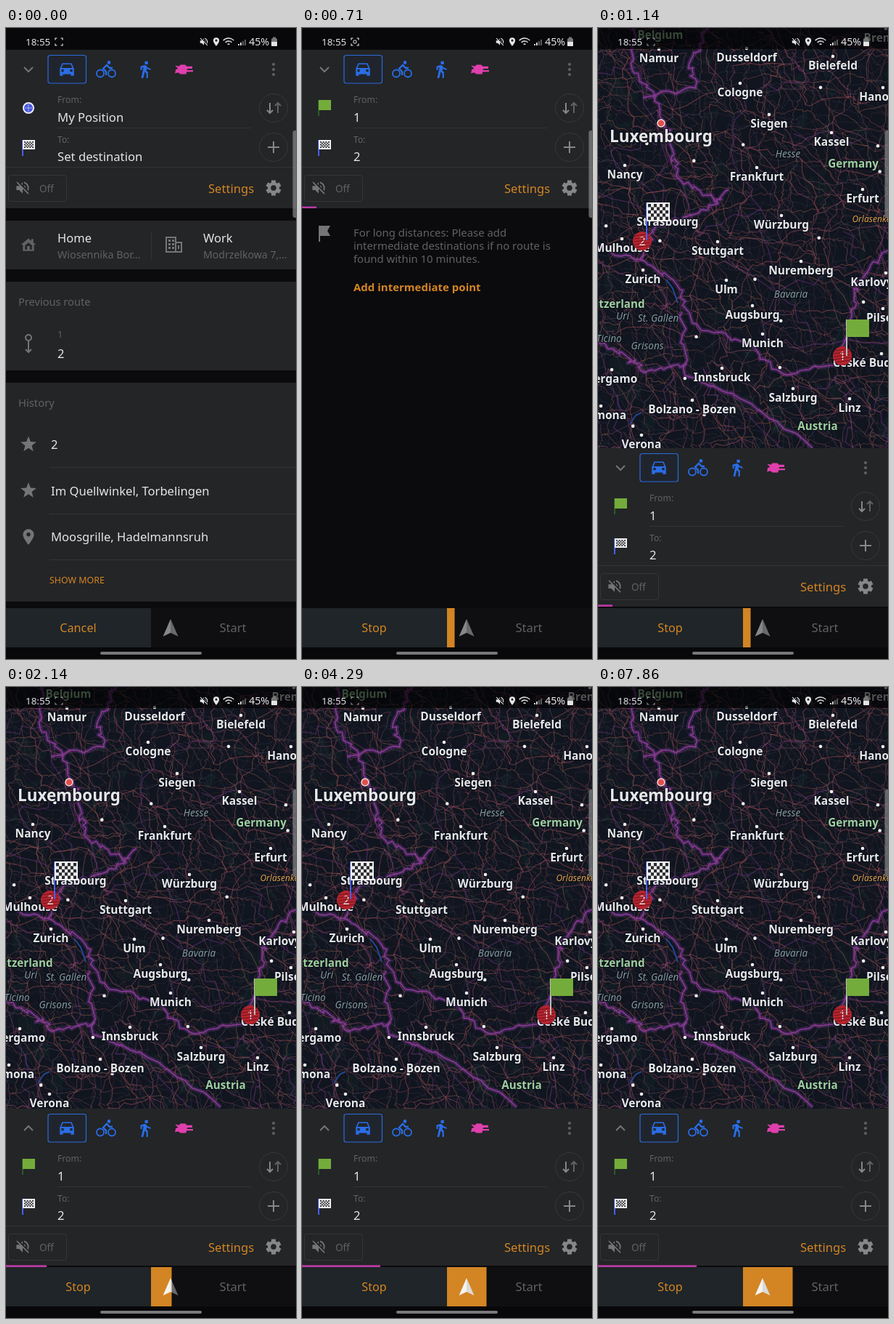
Write an HTML page with a canvas that moves like this. It is 400x868 px and loops after 8 s.

```html
<!DOCTYPE html>
<html lang="en">
<head>
<meta charset="utf-8">
<title>Route planner</title>
<style>
  html, body { margin: 0; width: 100%; height: 100%; overflow: hidden; background: #0b0a0d; }
  canvas { display: block; width: 400px; height: 868px; }
</style>
</head>
<body>
<canvas id="stage" width="400" height="868"></canvas>
<script>
const W = 400, H = 868, MAP_H = 620, LOOP = 8000, TICK = 1000 / 7, SHEET_DROP = 550;
const FONT = '"Noto Sans", sans-serif';
const ORANGE = '#d38524', BLUE = '#2a6de6', PINK = '#b83aa4', WHITE = '#e4e5e6';
const GREY = '#606264', ICON = '#737577', RULE = '#323436', PANEL = '#232527', BLACK = '#0b0a0d';
const stage = document.getElementById('stage').getContext('2d');
let c = stage;

const CAR = 'M6 5h12l3 7v9h-4v-2H7v2H3v-9zM5 11h14l-2-4.500H7zM5 13v3h3v-3zM16 13v3h3v-3z';
const WALK = 'M11.500 1.500h4v4h-4zM6 8l5-1.500 2 .5 2 2.500 4 1.500v2l-5-2-.5 2.500 2 2V23h-2v-6l-2-2-2 8H7L9.800 9.500 8 10v3H6z';
const HAND = 'M1 7l5 1 2-2h6l2 2h7v3h-6l-1 2h8v2h-8l-1 3H8l-3-2-4 1 1-5 3-1z';
const PIN = 'M12 2a7 7 0 00-7 7c0 5 7 13 7 13s7-8 7-13a7 7 0 00-7-7zM12 11.500a2.500 2.500 0 110-5 2.500 2.500 0 010 5z';
const MUTE = 'M3 9h4.700L3 4.300 4.300 3 21 19.700 19.700 21 12 13.300V20l-5-5H3zM12 4v4.200L9.900 6.100zM14 8q2.500 1.400 2.500 4.600L14 10zM14 3.200c6 1.500 8.500 8 6 13l-1.500-1.500C20 11 18 6.500 14 5.300z';
const HOME = 'M12 3L1 12h3v9h16v-9h3l-4-3V4h-3v2.500zM12 9l5 4v6h-3v-5h-4v5H7v-6z';

function text(str, x, y, size, color = WHITE, style = '', align = 'left') {
  c.font = `${style} ${size}px ${FONT}`;
  c.fillStyle = color;
  c.textAlign = align;
  c.fillText(str, x, y);
}
function rect(x, y, w, h, color) { c.fillStyle = color; c.fillRect(x, y, w, h); }
function box(x, y, w, h, r, stroke, fill, width = 1) {
  c.beginPath(); c.roundRect(x, y, w, h, r);
  if (fill) { c.fillStyle = fill; c.fill(); }
  if (stroke) { c.strokeStyle = stroke; c.lineWidth = width; c.stroke(); }
}
function disc(x, y, r, fill, stroke, width) { box(x - r, y - r, 2 * r, 2 * r, r, stroke, fill, width); }
function line(color, width, ...pts) {
  c.strokeStyle = color; c.lineWidth = width;
  c.beginPath();
  for (let i = 0; i < pts.length; i += 2) c.lineTo(pts[i], pts[i + 1]);
  c.stroke();
}
// Icon drawn on a 24-unit grid, centred at x, y
function icon(path, x, y, size, color) {
  c.save();
  c.translate(x - size / 2, y - size / 2); c.scale(size / 24, size / 24);
  c.fillStyle = color; c.fill(new Path2D(path), 'evenodd');
  c.restore();
}
function star(x, y, r, color) {
  c.beginPath();
  for (let i = 0; i < 10; i++) {
    const a = i * Math.PI / 5, d = i % 2 ? r * .42 : r;
    c.lineTo(x + d * Math.sin(a), y - d * Math.cos(a));
  }
  c.fillStyle = color; c.fill();
}
function arrow(x, y, size, color, dir) {
  line(color, 2, x, y - size * dir, x, y + size * dir);
  line(color, 2, x - 4, y + (size - 4) * dir, x, y + size * dir, x + 4, y + (size - 4) * dir);
}
function flag(x, y, w, h, poleHeight, poleColor, checkered) {
  line(poleColor, 2, x, y, x, y + poleHeight);
  rect(x, y, w, h, checkered ? '#eeeeee' : '#74ac3c');
  if (!checkered) return;
  const cols = 7, rows = 5, cw = (w - 4) / cols, ch = (h - 4) / rows;
  for (let i = 0; i < cols * rows; i += 2)
    rect(x + 2 + i % cols * cw, y + 2 + Math.floor(i / cols) * ch, cw, ch, '#2a2a2e');
}

// ---- Map ----
const CITIES = [['Namur', 84, 41], ['Dusseldorf', 205, 40], ['Bielefeld', 324, 51], ['Cologne', 196, 88],
  ['Siegen', 236, 131], ['Kassel', 322, 156], ['Nancy', 37, 201], ['Frankfurt', 219, 204], ['Erfurt', 365, 234],
  ['Strasbourg', 96, 266], ['Würzburg', 253, 270], ['Mulhouse', 33, 302], ['Stuttgart', 165, 306],
  ['Nuremberg', 280, 333], ['Karlovy Vary', 397, 349], ['Zurich', 62, 345], ['Ulm', 177, 359],
  ['Augsburg', 213, 394], ['Pilsen', 393, 398], ['Munich', 227, 433], ['České Budějovice', 391, 460],
  ['Bergamo', 19, 482], ['Innsbruck', 171, 480], ['Salzburg', 269, 508], ['Linz', 347, 522],
  ['Cremona', 4, 532], ['Bolzano - Bozen', 130, 524], ['Verona', 60, 572], ['Hanover', 393, 94],
  ['Bremen', 397, 13]];
const COUNTRIES = [['Belgium', 86, 10], ['Germany', 352, 187], ['Switzerland', 20, 380], ['Austria', 303, 548]];
const REGIONS = [['Hesse', 262, 173], ['Bavaria', 266, 366], ['Uri', 34, 396], ['St. Gallen', 83, 399],
  ['Ticino', 15, 427], ['Grisons', 68, 437]];
// A few key points per frontier; the wiggles between them are random
const BORDERS = [
  [48, 0, 50, 62, 84, 104, 102, 165, 112, 208, 165, 240],
  [62, 96, 135, 82, 126, 48, 152, 0],
  [180, 222, 152, 250, 82, 272, 58, 318, 0, 302],
  [58, 318, 108, 352, 130, 406, 200, 432, 256, 476, 334, 463],
  [334, 463, 350, 392, 358, 348, 400, 306],
  [116, 390, 120, 478, 184, 502, 296, 578],
  [0, 432, 40, 452, 64, 474, 122, 462]];

function makeRandom(seed) {
  return () => (seed = seed * 16807 % 2147483647) / 2147483647;
}
function wander(a, b, rough, steps, random) {
  const pts = [...a];
  for (let i = 1; i < steps; i++)
    for (const k of [0, 1]) pts.push(a[k] + (b[k] - a[k]) * i / steps + (random() - .5) * rough);
  return [...pts, ...b];
}
// Jittered grid whose neighbours are joined by crooked lines
function roads(step, colors, width, random) {
  const cols = Math.ceil(W / step) + 2, rows = Math.ceil(MAP_H / step) + 2;
  const nodes = Array.from({ length: cols * rows }, (_, i) =>
    [(i % cols - .5 + random() * .9) * step, (Math.floor(i / cols) - .5 + random() * .9) * step]);
  nodes.forEach((node, i) => {
    for (const j of [i + 1, i + cols, i + cols + 1]) {
      const chance = j === i + cols + 1 ? .35 : .78;
      if (!nodes[j] || chance < random() || (i + 1) % cols === 0) continue;
      line(colors[Math.floor(random() * colors.length)], width, ...wander(node, nodes[j], step * .2, 6, random));
    }
  });
}
function label(str, x, y, size, color, style) {
  y += size * .36;
  c.font = `${style} ${size}px ${FONT}`;
  c.textAlign = 'center'; c.lineWidth = 3; c.strokeStyle = '#0d121ccc';
  c.strokeText(str, x, y);
  text(str, x, y, size, color, style, 'center');
}
function marker(x, y, name) {
  disc(x, y, 13, '#b4242e');
  text(name, x, y + 6, 16, '#f4e6e6', '', 'center');
  for (let k = -8; k <= 8; k += 4) line('#70141d', 1, x - 11, y + k + 1, x + 11, y + k - 2);
}
function drawMap() {
  const random = makeRandom(4711);
  rect(0, 0, W, MAP_H, '#10151f');
  for (let i = 0; i < 80; i++) {
    c.beginPath();
    c.ellipse(random() * W, random() * MAP_H, 4 + random() * 16, 3 + random() * 9, random() * 3, 0, 7);
    c.fillStyle = '#16272955'; c.fill();
  }
  roads(15, ['#60384255', '#65456055', '#44506755'], .8, random);
  roads(23, ['#934a5088', '#87455588', '#a9645088', '#69516088'], .9, random);
  roads(48, ['#a8525888', '#954a6288'], 1.1, random);
  roads(85, ['#7a388a66', '#0000'], 1.6, random);
  line('#234a9a', 2, 94, 346, 103, 358, 110, 378);
  line('#22468c', 2, 44, 545, 52, 533, 60, 529);
  for (const border of BORDERS) {
    const pts = [];
    for (let i = 0; i < border.length - 2; i += 2)
      pts.push(...wander(border.slice(i, i + 2), border.slice(i + 2, i + 4), 9, 9, random));
    line('#8d3ba54d', 6, ...pts);
    line('#8a3c94', 1.5, ...pts);
  }
  for (let i = 0; i < 20; i++) disc(random() * W, 35 + random() * 540, 2.3, '#eee');
  for (const [name, x, y] of CITIES) {
    disc(x, y - 12, 2.3, '#eee');
    label(name, x, y, 15.5, '#e6e7e8', '600');
  }
  for (const [name, x, y] of COUNTRIES) label(name, x, y, 15.2, '#9fcf9f', '600');
  for (const [name, x, y] of REGIONS) label(name, x, y, 13.5, '#84999d', 'italic');
  label('Orlasenke', 377, 263, 12, '#e0a04c', 'italic');
  label('Luxembourg', 87, 149, 22.4, '#e6e7e8', '600');
  disc(87, 131, 5, '#e2504c', '#f0dedc', 1.5);
  marker(61, 293, '2'); flag(67, 240, 32, 26, 52, '#4a5ef0', true);
  marker(337, 451, '1'); flag(343, 401, 31, 24, 50, '#b9bdbb', false);
}
const mapCanvas = document.createElement('canvas');
mapCanvas.width = W; mapCanvas.height = MAP_H;

// ---- Interface ----
function statusBar(overMap, routing) {
  rect(0, 0, W, 29, overMap ? '#000000a8' : '#080709');
  text('18:55', 27, 23.5, 13.4);
  c.globalAlpha = overMap ? .6 : 1;
  for (const sx of [-1, 1]) for (const sy of [-1, 1])
    line(WHITE, 1.2, 73 + sx * 2.5, 19 + sy * 5, 73 + sx * 5, 19 + sy * 5, 73 + sx * 5, 19 + sy * 2.5);
  if (routing && !overMap) box(71, 17, 4, 4, 1, WHITE);
  c.globalAlpha = 1;
  icon(MUTE, 273, 19, 14, WHITE);
  icon(PIN, 290, 19, 14, WHITE);
  for (const r of [2, 6, 10]) {
    c.beginPath(); c.arc(307, 24, r, -2.4, -.75);
    c.strokeStyle = WHITE; c.lineWidth = 1.3; c.stroke();
  }
  for (let i = 0; i < 4; i++) rect(320 + i * 3, 22 - i * 2, 1.8, 2 + i * 2, i < 2 ? WHITE : '#666');
  text('45%', 335, 23.5, 14.3);
  box(366, 14, 8, 11, 2, null, '#777');
  box(366, 19, 8, 6, 1, null, WHITE);
  rect(368, 12.5, 4, 2, '#777');
}
function bike() {
  for (const x of [130, 146]) disc(x, 62.5, 5, null, BLUE, 1.8);
  line(BLUE, 2.3, 138, 65, 138, 60, 134, 56, 139, 51, 143, 55, 147, 55);
  disc(142, 47.5, 2.4, BLUE);
}
function gear(x, y) {
  for (let i = 0; i < 3; i++) {
    const dx = 10.5 * Math.sin(i * Math.PI / 3), dy = 10.5 * Math.cos(i * Math.PI / 3);
    line('#858789', 6, x - dx, y - dy, x + dx, y + dy);
  }
  disc(x, y, 8, '#858789');
  disc(x, y, 3.8, PANEL);
}
function planner(routing, percent, collapsed) {
  rect(0, 30, W, 218, PANEL);
  const tip = collapsed ? -3 : 3;
  line(ICON, 2, 25, 57 - tip, 31, 57 + tip, 37, 57 - tip);
  box(58, 37.5, 52.5, 38.5, 3, '#2d6ade', '#20252d', 1.2);
  icon(CAR, 84, 56, 26, BLUE);
  bike();
  icon(WALK, 192, 57, 26, BLUE);
  icon(HAND, 245, 57, 26, '#df3fac');
  for (const y of [50, 57, 64]) disc(369, y, 2, GREY);

  text('From:', 71, 103, 12.2, GREY);
  text(routing ? '1' : 'My Position', 71, 129, 16.7);
  text('To:', 71, 157.5, 12.2, GREY);
  text(routing ? '2' : 'Set destination', 71, 183, 16.7);
  if (routing) flag(23, 99, 17, 14, 22, '#2d5a2a', false);
  else {
    disc(31, 110, 7, '#4657d8', '#e8eaff', 2);
    line('#a9b3f2', 1, 26, 110, 36, 110);
    line('#a9b3f2', 1, 31, 105, 31, 115);
  }
  flag(23, 154, 17, 13, 22, '#4a5ef0', true);
  rect(71, 137, 267, 1, RULE);
  rect(0, 191, W, 1, RULE);
  for (const y of [110, 164]) disc(369, y, 19.5, null, '#363839');
  arrow(364, 110, 7, '#85878a', 1);
  arrow(375, 110, 7, GREY, -1);
  rect(361, 163, 16, 2, '#85878a');
  rect(368, 156, 2, 16, '#85878a');

  box(3.5, 202.5, 80, 36, 3, '#343638');
  icon(MUTE, 23, 220, 23, ICON);
  text('Off', 46, 225.5, 13.6, GREY);
  text('Settings', 279, 226.5, 16.6, ORANGE);
  gear(369, 220);
  rect(0, 245.5, percent * 4, 2.5, PINK);
}
function startLists() {
  for (const [y, h] of [[265, 67], [349, 122], [488, 301]]) rect(0, y, W, h, PANEL);
  icon(HOME, 31, 298, 23, GREY);
  text('Home', 71, 294.5, 16.5);
  text('Wiosennika Bor...', 71, 316.5, 14.3, GREY);
  rect(200, 280, 1, 38, RULE);
  box(221, 288, 13, 20, 0, ICON, null, 2);
  box(234, 295, 8, 13, 0, ICON, null, 2);
  for (const x of [224, 229]) for (const y of [291, 296, 301]) rect(x, y, 3, 3, ICON);
  rect(237, 299, 2, 5, ICON);
  text('Work', 272, 294.5, 16.5);
  text('Modrzelkowa 7,...', 272, 316.5, 14.1, GREY);

  text('Previous route', 17, 381.5, 14.6, GREY);
  arrow(31, 438, 8, ICON, 1);
  disc(31, 426, 4, PANEL, ICON, 2);
  text('1', 71, 426, 13, GREY);
  text('2', 71, 453.5, 16.5);

  text('History', 17, 521, 14.8, GREY);
  ['2', 'Im Quellwinkel, Torbelingen', 'Moosgrille, Hadelmannsruh'].forEach((name, i) => {
    const y = 573 + i * 63.5;
    if (i < 2) star(31, y, 11.5, ICON); else icon(PIN, 31, y, 26, ICON);
    text(name, 62, y + 6, 16.6);
    rect(60, Math.round(y + 31), W, 1, RULE);
  });
  text('SHOW MORE', 60, 764, 12.4, ORANGE);
}
function routingHint() {
  rect(23, 272, 2, 22, ICON);
  icon('M0 0h16l-4 7 4 7H0z', 35, 284, 24, ICON);
  ['For long distances: Please add', 'intermediate destinations if no route is', 'found within 10 minutes.']
    .forEach((row, i) => text(row, 71, 286.5 + i * 18, 14.9, GREY));
  text('Add intermediate point', 71, 362, 15, ORANGE, '600');
}
function compass(left, right) {
  for (const [side, color] of [[-1, left], [1, right]]) {
    c.fillStyle = color;
    c.fill(new Path2D(`M227 813l${side * 10.5} 24L227 832z`));
  }
}
function bottomBar(routing, percent) {
  const top = routing ? 796 : 789;
  rect(0, top, W, H - top, BLACK);
  rect(0, 798, 200, 54, '#1f2529');
  rect(200, 798, 200, 54, '#0f0e10');
  compass('#858789', '#67696b');
  if (percent) {
    c.save();
    c.beginPath(); c.rect(200, 798, percent * 2 + 0.5, 54); c.clip();
    rect(200, 798, 200, 54, ORANGE);
    compass('#f5f3f0', '#dcdad7');
    c.restore();
  }
  text(routing ? 'Stop' : 'Cancel', 99.5, 831, 16.2, ORANGE, '', 'center');
  text('Start', 313, 831, 16.5, GREY, '', 'center');
  rect(0, 852, W, 16, '#080709');
  box(130, 858, 140, 4, 2, null, '#77787a');
}
// Quick start, a steady climb to 25 %, then a slow crawl
function progressAt(ms) {
  const ramp = (from, to) => Math.min(1, Math.max(0, (ms - from) / (to - from)));
  return Math.floor(5 * ramp(290, 430) + 20 * ramp(1290, 3000) + 9 * ramp(3000, 7860) + .01);
}
function draw(ms) {
  const tick = Math.floor((ms + 4) / TICK);
  const routing = tick >= 2;
  const percent = progressAt(tick * TICK);
  // The sheet slides down and decelerates, revealing the map
  const slide = Math.min(1, Math.max(0, (tick - 6) * .423));
  const drop = Math.round(SHEET_DROP * (1 - (1 - slide) ** 3));

  rect(0, 0, W, H, BLACK);
  if (drop) c.drawImage(mapCanvas, 0, 0);
  c.save();
  c.translate(0, drop);
  rect(0, 30, W, H, BLACK);
  planner(routing, percent, slide === 1);
  if (routing) routingHint(); else startLists();
  c.restore();
  bottomBar(routing, percent);
  if (drop) rect(0, Math.min(drop + 245.5, 795.5), percent * 4, 2.5, PINK);
  statusBar(drop > 0, routing);
  box(395.5, 141, 8, 120, 3, null, '#8d8f91aa');
}

c = mapCanvas.getContext('2d');
c.lineJoin = 'round';
drawMap();
c = stage;
function frame() {
  draw(performance.now() % LOOP);
  requestAnimationFrame(frame);
}
frame();
</script>
</body>
</html>
```
